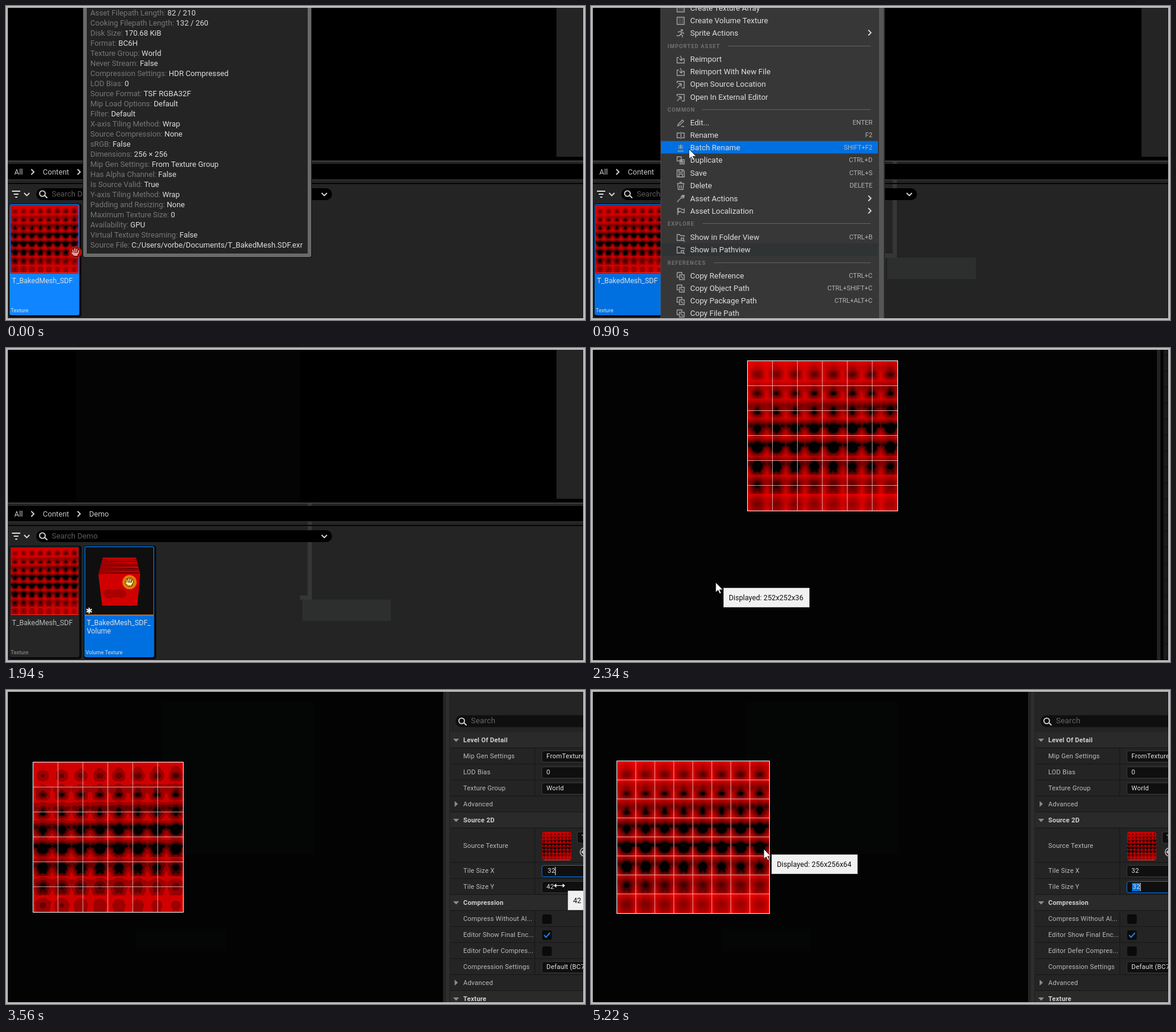
Recreate the animation shown at these times as an HTML page with a canvas. Size 975x529 px, loop 5.62 s.

```html
<!DOCTYPE html>
<html lang="en">
<head>
<meta charset="utf-8">
<title>Volume texture tile size</title>
<style>
html, body { margin: 0; width: 100%; height: 100%; overflow: hidden; background: #000; }
#stage { position: relative; width: 975px; height: 529px; overflow: hidden; }
#stage div, #stage svg, #stage canvas { position: absolute; left: 0; top: 0; }
#frame { position: absolute; inset: 0; width: 969px; height: 523px; border: 3px solid #b9bdbb; }
text { font: 13px Roboto, sans-serif; fill: #dedede; white-space: pre; }
.tip { font-size: 12.8px; }
.key { fill: #777; }
.head { font-size: 9px; font-weight: bold; letter-spacing: 1px; fill: #727272; }
.short { font-size: 11px; fill: #b4b4b4; text-anchor: end; }
.crumb { font-size: 12.6px; fill: #c4c4c4; }
.name { font-size: 12px; }
.kind { font-size: 9px; }
.row { font-size: 11px; letter-spacing: .2px; fill: #bcbcbc; }
.cat { font-size: 11px; letter-spacing: .2px; font-weight: bold; fill: #d0d0d0; }
.val { font-size: 11px; letter-spacing: .2px; fill: #e4e4e4; }
.pale { font-size: 12.2px; fill: #111; }
.icon { fill: none; stroke: #a2a2a2; stroke-width: 1.4; }
.chev { fill: none; stroke: #d8d8d8; stroke-width: 1.8; }
</style>
</head>
<body>
<div id="stage"></div>
<script>
const LOOP = 5620;
const stage = document.getElementById('stage');
const rules = new Map();

// Style that shows an element only between two times of the loop.
function during(a, b) {
  const pct = t => t === LOOP ? 100 : Math.max(0, t - 2) / LOOP * 100;
  const id = `on${a}to${b}`;
  rules.set(id, `@keyframes ${id}{0%{opacity:${a ? 0 : 1}}` +
    `${pct(a)}%{opacity:1}${pct(b)}%{opacity:0}}`);
  return `animation:${id} ${LOOP}ms step-end infinite`;
}
const show = (a, b, body) => `<g style="${during(a, b)}">${body}</g>`;
const rect = (x, y, w, h, fill, more = '') =>
  `<rect x="${x}" y="${y}" width="${w}" height="${h}" fill="${fill}" ${more}/>`;
const text = (x, y, s, cls = '', more = '') => `<text x="${x}" y="${y}" class="${cls}" ${more}>${s}</text>`;
const path = (d, cls = 'icon', more = '') => `<path d="${d}" class="${cls}" ${more}/>`;
const at = (x, y, body) => `<g transform="translate(${x} ${y})">${body}</g>`;
const svg = body => `<svg width="975" height="529">${body}</svg>`;
const lens = (x, y) => path(`M${x + 3} ${y + 3}l4.5 4.5M${x + 4} ${y}a4.7 4.7 0 1 1-9.4 0a4.7 4.7 0 1 1 9.4 0`, 'chev', 'stroke-width="1.5"');
const paleTip = (x, y, w, h, s, pad) =>
  rect(x, y, w, h, '#c4c4c4') + rect(x + 1, y + 1, w - 2, h - 2, '#f1f1f1') + text(x + pad, y + h / 2 + 4.5, s, 'pale');

/* ---- distance field: 64 slices laid out as 8 by 8 tiles ---- */
const blobs = [ // centre, radii
  [16, 17, 17.5, 9, 9, 7],
  [16, 22.5, 7.5, 4, 2.4, 3.6],
  [16, 19, 11.5, 3, 6.5, 3.5],
  [5.5, 13, 16, 4, 2.6, 3.8],
  [26.5, 13, 16, 4, 2.6, 3.8],
  [12.5, 25, 21, 2, 2, 2],
  [19.5, 25, 21, 2, 2, 2]
];
function distance(x, y, z) {
  let best = 99;
  for (const [cx, cy, cz, rx, ry, rz] of blobs) {
    const a = (x - cx) / rx, b = (y - cy) / ry, c = (z - cz) / rz;
    const k = Math.hypot(a, b, c), g = Math.hypot(a / rx, b / ry, c / rz) || 1;
    best = Math.min(best, k * (k - 1) / g);
  }
  return best;
}
function atlas(tone) {
  const c = document.createElement('canvas');
  c.width = c.height = 256;
  const g = c.getContext('2d'), img = g.createImageData(256, 256);
  for (let y = 0, i = 0; y < 256; y++) for (let x = 0; x < 256; x++, i += 4) {
    const d = distance(x % 32 + .5, y % 32 + .5, ((y >> 5) * 8 + (x >> 5)) / 2);
    img.data[i] = tone(255 * Math.min(1, Math.sqrt(Math.max(0, d) / 17)));
    img.data[i + 3] = 255;
  }
  g.putImageData(img, 0, 0);
  return c;
}
const smooth = atlas(v => v);
const banded = atlas(v => Math.min(208, Math.round(v / 52) * 52));

function canvas(parent, x, y, w, h, draw, style = '') {
  const c = document.createElement('canvas');
  c.width = w; c.height = h;
  c.style.cssText = `left:${x}px;top:${y}px;${style}`;
  draw(c.getContext('2d'));
  parent.append(c);
}
function tiles(x, y, w, h, tw, th, src, a, b) {
  canvas(editor, x, y, w + 2, h + 2, g => {
    g.drawImage(src, 0, 0, w, h, 1, 1, w, h);
    g.fillStyle = 'rgba(255,205,205,.75)';
    for (let i = tw; i < w; i += tw) g.fillRect(i, 0, 1, h + 2);
    for (let i = th; i < h; i += th) g.fillRect(0, i, w + 2, 1);
    g.strokeStyle = '#fff';
    g.strokeRect(.5, .5, w + 1, h + 1);
  }, during(a, b));
}
function layer(style, body) {
  const d = document.createElement('div');
  d.style.cssText = style;
  d.innerHTML = svg(body);
  stage.append(d);
  return d;
}

/* ---- asset browser ---- */
const card = (x, fill, label, kind, dim) =>
  rect(x - 1, 333, 122, 191, '#070707', 'rx="4"') +
  rect(x, 334, 117.5, 187, fill, 'rx="3"') + rect(x + 1.5, 335.5, 114.5, 115, '#0f0f0f') +
  label.map((s, i) => text(x + 4, 467 + 14 * i, s, 'name', dim ? 'fill-opacity=".8"' : '')).join('') +
  text(x + 2, 516, kind, 'kind', dim ? 'fill-opacity=".6"' : '');
const soft = ['T_BakedMesh_SDF'];

let stripes = '';
for (let i = 0; i < 11; i++) {
  const y = 356 + i * 2.4, l = 162 - i * .6;
  stripes += `M${l} ${y}L${l + 58 + i} ${y + 1.2 * Math.sin(i * 2.3)}`;
}
const cube = '<path d="M163 353H219L226 382L221 434H162L155.500 382Z" fill="#d00000"/>' +
  path(stripes, '', 'stroke="#5a0000" fill="none"') +
  '<path d="M164 409q9-5 18-1q11-4 20 2q3 9-8 11q-9-3-18 1q-12 0-12-13Z" fill="#a80000"/>';

const browser = layer(during(0, 2340),
  rect(0, 0, 975, 529, '#242424') + rect(3, 3, 924, 257, '#000') + rect(927, 254, 45, 6, '#000') +
  rect(3, 261, 969, 1, '#4c4c4c') +
  show(400, 2340, rect(508, 262, 7, 162, '#363636') + rect(495, 417, 20, 7, '#363636')) +
  rect(3, 266, 969, 26, '#000') + rect(3, 292, 969, 1, '#383838') + rect(3, 298, 969, 2, '#050505') +
  text(14, 284, 'All', 'crumb') + text(62, 284, 'Content', 'crumb') + text(140, 284, 'Demo', 'crumb') +
  path('M42.500 275l4.500 4.500l-4.500 4.500M120.500 275l4.500 4.500l-4.500 4.500', 'chev') +
  path('M10 312h14M13 317h8M15.500 322h3.500M30.500 315l4.500 4.500l4.500-4.500', 'chev', 'stroke-width="1.6"') +
  rect(51, 307, 498, 20, '#000', 'rx="10"') + lens(62, 316) +
  text(77, 321, 'Search Demo', '', 'style="fill:#5c5c5c"') + path('M531.500 315l4.500 4.500l4.500-4.500', 'chev') +
  show(0, 400, card(6, '#0f86ff', soft, 'Texture')) +
  show(400, 1600, card(6, '#0070e0', soft, 'Texture')) +
  show(800, 2340, rect(499, 424, 149, 36, '#2d2f2e')) +
  show(1600, 2340, card(6, '#262626', soft, 'Texture', 1) + rect(118, 3, 377, 257, '#040404') +
    card(132, '#0070e0', ['T_BakedMesh_SDF_', 'Volume'], 'Volume Texture') + cube +
    rect(133, 449, 115, 2, '#b0703c') +
    path('M140 437.500v10M135.500 440l9 5M144.500 440l-9 5', '', 'stroke="#eee" stroke-width="2.2"')));
canvas(browser, 8, 336, 114, 114, g => {
  g.drawImage(banded, 0, 0, 114, 114);
  g.fillStyle = '#e83434';
  g.fillRect(0, 113, 114, 1);
});

const facts = `Asset Filepath Length|82 / 210
Cooking Filepath Length|132 / 260
Disk Size|170.68 KiB
Format|BC6H
Texture Group|World
Never Stream|False
Compression Settings|HDR Compressed
LOD Bias|0
Source Format|TSF RGBA32F
Mip Load Options|Default
Filter|Default
X-axis Tiling Method|Wrap
Source Compression|None
sRGB|False
Dimensions|256 × 256
Mip Gen Settings|From Texture Group
Has Alpha Channel|False
Is Source Valid|True
Y-axis Tiling Method|Wrap
Padding and Resizing|None
Maximum Texture Size|0
Availability|GPU
Virtual Texture Streaming|False
Source File|C:/Users/vorbe/Documents/T_BakedMesh.SDF.exr`.split('\n').map(s => s.split('|'));
const info = rect(129, 0, 386, 424, '#111', 'rx="3"') + rect(130, -5, 384, 428, '#6a6a6a', 'rx="3"') +
  rect(136, -5, 372, 422, '#242424') +
  facts.map(([k, v], i) => text(142, 16 + 17 * i, `<tspan class="key">${k}:</tspan> ${v}`, 'tip')).join('');

/* ---- context menu ---- */
const icons = {
  grid: 'M1 1h12v12h-12zM4 4h1M7 4h1M10 4h1M4 7h1M7 7h1M10 7h1M4 10h1M7 10h1M10 10h1',
  run: 'M8 1h2v2h-2zM2 5l4-1l3 2l-2 3l3 1v4M7 8l-2 3h-5M9 6l4 1',
  load: 'M4 4H1v9h12V6h-3M6 1q3 2 2 8M5 6l3 3l3-3',
  out: 'M1 5V2h12v11H9M1 13l7-7M3 6h5v5',
  pen: 'M2 12l1-3l7-7l2 2l-7 7zM8 13h5',
  name: 'M6 3H1v8h5M9 3h4v8H9M7.500 1v12',
  star: 'M7 1v8M3 3l8 5M11 3l-8 5M2 12.500h10',
  twin: 'M1 1h7v7h-7zM6 6h7v7h-7zM9.500 7v5M7 9.500h5',
  disk: 'M1 1h10l2 2v10H1zM4 1v4h6V1M4 13V8h6v5',
  bin: 'M1 3h12M5 1h4M2 4l1 9h8l1-9M5.500 6v5M8.500 6v5',
  tool: 'M1 12l7-7M8 5q-1-4 4-4l-2 2l1 1l2-2q0 5-5 3',
  flag: 'M2 1v12M3 2q3-1 5 1t5 0v6q-3 1-5-1t-5 1z',
  find: 'M7 12H1V2h4l2 2h6v2M8 8h4v4h-4zM12 12l2 2',
  copy: 'M1 1h8v3M1 1v8h3M5 5h8v8h-8zM7 7l4 4'
};
const menu = [
  [3, 'Create Texture Array', 'grid'], [24, 'Create Volume Texture', 'grid'], [45, 'Sprite Actions', 'run', '>'],
  [68, 'IMPORTED ASSET', 231],
  [89, 'Reimport', 'load'], [110, 'Reimport With New File', 'load'],
  [131, 'Open Source Location', 'out'], [153, 'Open In External Editor', 'out'],
  [175, 'COMMON', 187],
  [196, 'Edit...', 'pen', 'ENTER'], [217, 'Rename', 'name', 'F2'], [238, 'Batch Rename', 'star', 'SHIFT+F2'],
  [259, 'Duplicate', 'twin', 'CTRL+D'], [281, 'Save', 'disk', 'CTRL+S'], [302, 'Delete', 'bin', 'DELETE'],
  [324, 'Asset Actions', 'tool', '>'], [345, 'Asset Localization', 'flag', '>'],
  [367, 'EXPLORE', 188],
  [389, 'Show in Folder View', 'find', 'CTRL+B'], [410, 'Show in Pathview', 'find'],
  [433, 'REFERENCES', 207],
  [454, 'Copy Reference', 'copy', 'CTRL+C'], [475, 'Copy Object Path', 'copy', 'CTRL+SHIFT+C'],
  [496, 'Copy Package Path', 'copy', 'CTRL+ALT+C'], [517, 'Copy File Path', 'copy']
];
const menuRow = ([y, label, icon, hint]) => {
  if (typeof icon === 'number')
    return text(129, y + 3, label, 'head') + rect(icon, y - 1, 471 - icon, 1, '#626262');
  const end = !hint ? '' : hint === '>' ? path(`M467 ${y - 4.5}l4.500 4.500l-4.500 4.500`, 'chev')
    : text(474, y + 4, hint, 'short');
  return at(144, y - 6, path(icons[icon])) + text(167, y + 4.5, label) + end;
};
const hover = [[400, 800, 410], [800, 900, 345], [900, 1000, 238], [1000, 1100, 110], [1100, 1200, 45], [1200, 1600, 24]];
const popup = rect(117, 0, 378, 529, '#4a4a4a') + rect(118, 0, 367, 529, '#373737') +
  rect(485, 0, 8, 529, '#565656') + rect(493, 0, 2, 529, '#2c2c2c') +
  show(800, 1600, rect(118, 400, 365, 21, '#303333')) +
  hover.map(([a, b, y]) => show(a, b, rect(118, y - 10.5, 365, 21, '#0070e0'))).join('') +
  menu.map(menuRow).join('');
layer('', show(0, 400, info) + show(400, 1600, popup) +
  show(400, 800, paleTip(499, 424, 149, 36, 'Finds this asset on disk', 11)));

/* ---- texture editor ---- */
const box = (y, s = '', edge = '#383838') =>
  rect(902.5, y - 8.5, 90, 19, '#0f0f0f', `rx="3.500" stroke="${edge}"`) + text(910, y + 4, s, 'val');
const focus = (y, s, mark) => box(y, '', '#0070e0') +
  (mark ? rect(911, y - 6, 13, 14, '#0070e0') : '') + text(912, y + 4, s, 'val') +
  rect(912 + s.length * 6.3, y - 6, 1, 14, '#fff');
const check = y => rect(903, y - 7, 16, 16, '#0a0a0a', 'rx="3"');
const rows = [
  [84, 'Level Of Detail', 1], [111, 'Mip Gen Settings', box(111, 'FromTextureGroup')], [138, 'LOD Bias', box(138, '0')],
  [165, 'Texture Group', box(165, 'World')], [192, 'Advanced', 2], [219, 'Source 2D', 1],
  [262, 'Source Texture', ''], [304, 'Tile Size X', ''], [331, 'Tile Size Y', ''], [358, 'Compression', 1],
  [385, 'Compress Without Al...', check(385)],
  [412, 'Editor Show Final Enc...', check(412) + path('M906 413l3.500 3.500l6.500-7.500', '', 'fill="none" stroke="#1a80f0" stroke-width="2"')],
  [439, 'Editor Defer Compres...', check(439)], [466, 'Compression Settings', box(466, 'Default (BC7)')],
  [493, 'Advanced', 2], [520, 'Texture', 1]
];
const panelRow = ([y, label, kind]) => {
  const h = y === 262 ? 58 : 27, top = y === 262 ? 233 : y - 13;
  const head = kind === 1, fold = kind === 2;
  return rect(748, top, 224, h - 1, head ? '#2a2a2a' : '#242424') + rect(748, top + h - 1, 224, 1, '#161616') +
    (head ? path(`M753 ${y - 2}h10l-5 5.500z`, '', 'fill="#8c8c8c"') :
      fold ? path(`M755.500 ${y - 5}v10l5.500-5z`, '', 'fill="#8c8c8c"') : rect(890, top, 1, h, '#161616') + kind) +
    text(770, y + 4, label, head ? 'cat' : 'row');
};
const panel = rect(736, 0, 239, 529, '#161616') + rect(736, 0, 5, 529, '#242424') + rect(741, 0, 5, 529, '#2e2e2e') +
  rect(746, 0, 229, 529, '#242424') +
  rect(757, 42.5, 240, 20, '#0f0f0f', 'rx="10"') + lens(768, 52) +
  text(783, 56, 'Search', '', 'style="fill:#666;letter-spacing:.2px"') + rows.map(panelRow).join('') +
  rect(962, 239, 30, 19, '#0d0d0d', 'rx="3" stroke="#3a3a3a"') + text(969, 252, 'T', 'val') +
  '<circle cx="974" cy="273" r="7" fill="none" stroke="#c0c0c0" stroke-width="1.500"/>' +
  path('M974 269l-4 4l4 4', 'chev') +
  show(2740, 3245, box(304, '42')) + show(3245, 3350, focus(304, '42', 1)) +
  show(3350, 3455, focus(304, '3')) + show(3455, 3960, focus(304, '32')) + show(3960, LOOP, box(304, '32')) +
  show(2740, 3960, box(331, '42')) + show(3960, 4360, focus(331, '42', 1)) +
  show(4360, 4480, focus(331, '32')) + show(4480, LOOP, focus(331, '32', 1));
let ticks = '';
for (let y = 12; y < 526; y += 27) ticks += `M967 ${y}h5`;
const editor = layer(during(2340, LOOP),
  rect(0, 0, 975, 529, '#030303') +
  show(2340, 2740, rect(953, 3, 6, 523, '#222') + rect(964, 3, 8, 523, '#1a1a1a') +
    path(ticks, '', 'stroke="#080808"')) +
  show(2740, LOOP, rect(263, 21, 255, 255, '#040605') + rect(220, 403, 150, 36, '#040605') + panel));
tiles(263, 21, 252, 252, 42, 42, smooth, 2340, 2740);
tiles(45, 121, 252, 252, 42, 42, banded, 2740, 3960);
tiles(43, 121, 256, 252, 32, 42, smooth, 3960, 4480);
tiles(43, 119, 256, 256, 32, 32, smooth, 4480, LOOP);
canvas(editor, 903, 239, 49, 48, g => {
  g.drawImage(banded, 0, 0, 49, 48);
  g.fillStyle = '#e83434';
  g.fillRect(0, 47, 49, 1);
}, 'border-radius:4px;' + during(2740, LOOP));

/* ---- pointer and its tips ---- */
const arrow = path('M0 0V16.500L4 13L6.700 19L9.200 18L6.500 12.200H12Z', '', 'fill="#fff" stroke="#111" stroke-width=".8"');
const dot = (fill, r = 12, o = 1) => `<circle r="${r}" fill="${fill}" opacity="${o}"/>`;
const hand = fill => {
  const d = 'M-3.500 2L-4.300-4M-1-1V-6M1.800-1L2.300-5.500M4.300 2L5.500-3M-2 5L-6 1';
  const palm = 'M-4.500 0H5L3.800 6.500H-1.500Z';
  return path(d, '', 'stroke="#300" stroke-width="3.400" stroke-linecap="round"') +
    path(palm, '', `fill="${fill}" stroke="#300" stroke-width="1"`) +
    path(d, '', `stroke="${fill}" stroke-width="2" stroke-linecap="round"`);
};
const sizer = path('M-10 0L-5-4.500V-1H5V-4.500L10 0L5 4.500V1H-5V4.500Z', '', 'fill="#fff" stroke="#000" stroke-width="1"');
const redHand = dot('#b81010', 10.5) + hand('#ff9c94');
const goldHand = dot('#e07c08') + hand('#fff08a');
const click = dot('#d8e030', 12, .65) + arrow;
const pointer = [
  [0, 400, 117, 415, redHand], [400, 800, 117, 416, arrow],
  [800, 900, 128, 350, arrow], [900, 1000, 165, 241, arrow], [1000, 1100, 205, 112, arrow],
  [1100, 1200, 226, 42, arrow], [1200, 1600, 232, 24, click],
  [1600, 1713, 233, 150, arrow], [1713, 1827, 253, 304, arrow], [1827, 1940, 282, 393, click],
  [1940, 2340, 208, 394.5, goldHand],
  [2340, 2740, 210, 395, arrow], [2740, 3140, 706, 82, arrow], [3140, 3245, 836, 225, arrow],
  [3560, 3960, 932, 329.5, sizer],
  [4880, 4993, 836, 346, arrow], [4993, 5107, 434, 312, arrow], [5107, 5220, 330, 284, arrow],
  [5220, LOOP, 291, 268, arrow]
];
layer('', show(2340, 2740, paleTip(223, 404, 145, 33, 'Displayed: 252x252x36', 9)) +
  show(3560, 3960, paleTip(946, 338, 40, 33, '42', 9)) +
  show(5220, LOOP, paleTip(304, 277, 145, 33, 'Displayed: 256x256x64', 9)) +
  pointer.map(([a, b, x, y, body]) => show(a, b, at(x, y, body))).join(''));

stage.insertAdjacentHTML('beforeend', '<div id="frame"></div>');
const sheet = document.createElement('style');
sheet.textContent = [...rules.values()].join('\n');
document.head.append(sheet);
</script>
</body>
</html>
```
